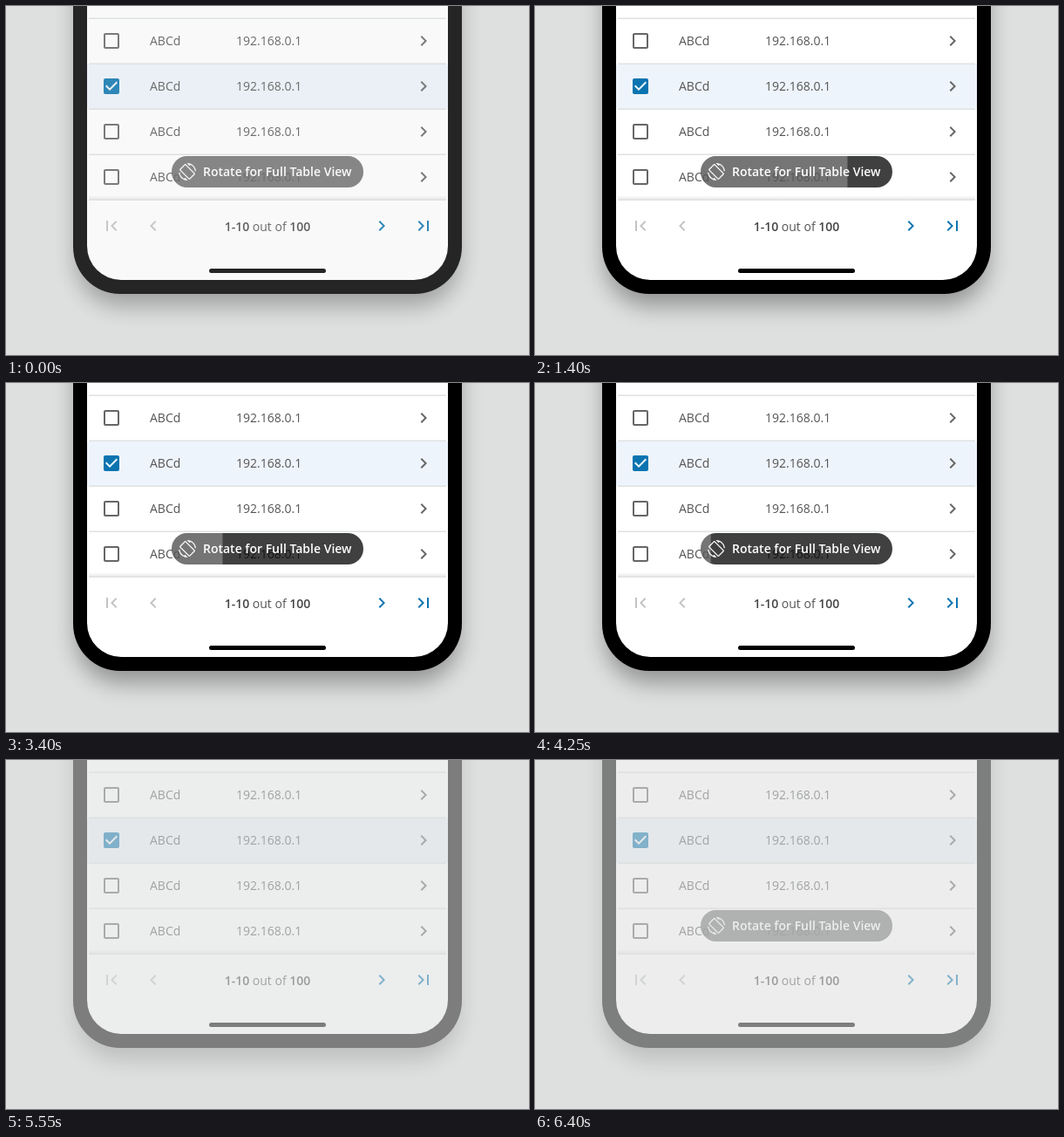
These frames come from a looping animation (600 by 400 pixels, 6450 ms). An HTML page:

```html
<!DOCTYPE html>
<html lang="en">
<head>
<meta charset="utf-8">
<title>Rotate hint</title>
<style>
  html, body { margin: 0; width: 100%; height: 100%; overflow: hidden; background: #dee0df; }
  svg { display: block; width: 600px; height: 400px; }
  text { font: 14px "Open Sans", sans-serif; fill: #555; }
  .strong { font-weight: 600; fill: #444; }
  .icon { fill: #666; }
  .blue { fill: #0b74b0; }
  .off { fill: #c2c4c4; }
  .line { fill: #dfe2e4; }
  .hint text { font-weight: 600; fill: #fff; }
</style>
</head>
<body>
<svg viewBox="0 0 600 400">
  <defs>
    <filter id="blur" x="-20%" y="-20%" width="140%" height="140%">
      <feGaussianBlur stdDeviation="13"/>
    </filter>
    <linearGradient id="lip" x1="0" y1="0" x2="0" y2="1">
      <stop offset="0" stop-color="#000" stop-opacity="0"/>
      <stop offset="1" stop-color="#000" stop-opacity=".09"/>
    </linearGradient>
    <clipPath id="pill"><rect x="190" y="172" width="220" height="36" rx="18"/></clipPath>
    <path id="box" d="M19 5v14H5V5h14m0-2H5c-1.1 0-2 .9-2 2v14c0 1.1.9 2 2 2h14c1.1 0 2-.9 2-2V5c0-1.1-.9-2-2-2z"/>
    <path id="checked" d="M19 3H5c-1.11 0-2 .9-2 2v14c0 1.1.89 2 2 2h14c1.11 0 2-.9 2-2V5c0-1.1-.89-2-2-2zm-9 14l-5-5 1.41-1.41L10 14.17l7.59-7.59L19 8l-9 9z"/>
    <path id="next" d="M10 6L8.59 7.41 13.17 12l-4.58 4.59L10 18l6-6z"/>
    <path id="prev" d="M15.41 7.41L14 6l-6 6 6 6 1.41-1.41L10.83 12z"/>
    <path id="last" d="M5.59 7.41L10.18 12l-4.59 4.59L7 18l6-6-6-6zM16 6h2v12h-2z"/>
    <path id="first" d="M18.41 16.59L13.82 12l4.59-4.59L17 6l-6 6 6 6zM6 6h2v12H6z"/>
    <path id="rotate" d="M16.48 2.52c3.27 1.55 5.61 4.72 5.97 8.48h1.5C23.44 4.84 18.29 0 12 0l-.66.03 3.81 3.81 1.33-1.32zm-6.25-.77c-.59-.59-1.54-.59-2.12 0L1.75 8.11c-.59.59-.59 1.54 0 2.12l12.02 12.02c.59.59 1.54.59 2.12 0l6.36-6.36c.59-.59.59-1.54 0-2.12L10.23 1.75zm4.6 19.44L2.81 9.17l6.36-6.36 12.02 12.02-6.36 6.36zm-7.31.29C4.25 19.94 1.91 16.76 1.55 13H.05C.56 19.16 5.71 24 12 24l.66-.03-3.81-3.81-1.33 1.32z"/>
  </defs>
  <g id="phone">
    <rect x="80" y="-120" width="440" height="464" rx="52" opacity=".34" filter="url(#blur)"/>
    <rect x="77" y="-120" width="446" height="450" rx="54"/>
    <rect x="93" y="-100" width="414" height="414" rx="39" fill="#fff"/>
    <g id="rows"></g>
    <rect x="95" y="217" width="410" height="5" fill="url(#lip)"/>
    <rect class="line" x="95" y="221.5" width="410" height="1.5"/>
    <use href="#first" class="off" x="109" y="240"/>
    <use href="#prev" class="off" x="157" y="240"/>
    <text x="300" y="258" text-anchor="middle"><tspan class="strong">1-10</tspan> out of <tspan class="strong">100</tspan></text>
    <use href="#next" class="blue" x="419" y="240"/>
    <use href="#last" class="blue" x="467" y="240"/>
    <rect x="233" y="301" width="134" height="5" rx="2.5"/>
    <g id="hint" class="hint">
      <g clip-path="url(#pill)">
        <rect x="190" y="172" width="220" height="36" opacity=".75"/>
        <rect id="timer" x="190" y="172" width="220" height="36" fill="#fff" opacity=".28"/>
      </g>
      <use href="#rotate" fill="#fff" transform="translate(198 180) scale(.8333)"/>
      <text x="226" y="195">Rotate for Full Table View</text>
    </g>
  </g>
</svg>
<script>
const LOOP = 6450, STEP = 50;
const $ = id => document.getElementById(id);

// [time, value] pairs, linear in between
const phoneFade = [[0, .83], [50, .91], [100, .97], [150, 1], [5090, 1], [5250, .83], [5550, .44],
                   [5800, .15], [6000, 0], [6150, 0], [6400, .43], [6450, .5]];
const hintFade = [[0, 1], [4500, 1], [4800, 0], [6100, 0], [6101, 1]];
const timerWidth = [[0, 220], [463, 220], [4463, 0], [6100, 0], [6101, 220]];

function valueAt(track, t) {
  const i = track.findIndex(([time]) => time > t);
  if (i < 0) return track[track.length - 1][1];
  const [t0, a] = track[i - 1], [t1, b] = track[i];
  return a + (b - a) * (t - t0) / (t1 - t0);
}

function row(y, selected) {
  return `
    ${selected ? `<rect x="93" y="${y - 25}" width="414" height="51" fill="#eef4fb"/>` : ''}
    <rect class="line" x="95" y="${y - 26.5}" width="410" height="1.5"/>
    <use href="#${selected ? 'checked' : 'box'}" class="${selected ? 'blue' : 'icon'}" x="109" y="${y - 12}"/>
    <text x="165" y="${y + 5}">ABCd</text>
    <text x="264" y="${y + 5}">192.168.0.1</text>
    <use href="#next" class="icon" x="467" y="${y - 12}"/>`;
}

$('rows').innerHTML = [0, 1, 2, 3].map(i => row(40 + 52 * i, i === 1)).join('');

function draw(now) {
  const t = Math.floor(now % LOOP / STEP) * STEP;
  $('phone').setAttribute('opacity', valueAt(phoneFade, t));
  $('hint').setAttribute('opacity', valueAt(hintFade, t));
  $('timer').setAttribute('width', valueAt(timerWidth, t));
}

const start = performance.now();
function tick() {
  draw(performance.now() - start);
  requestAnimationFrame(tick);
}
tick();
</script>
</body>
</html>
```
